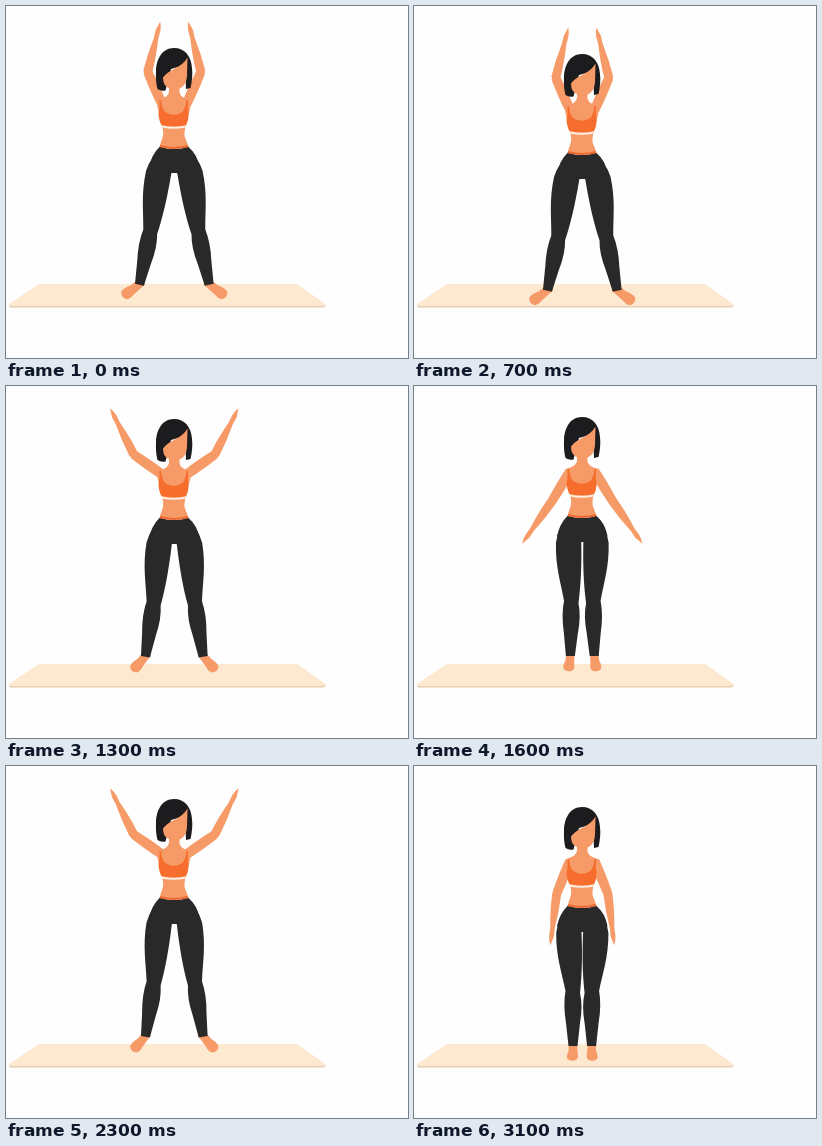
Animation of 402 by 352 pixels, one loop 3.2 s. Source, as an HTML page without scripts:

```html
<!DOCTYPE html>
<html lang="en">
<head>
<meta charset="utf-8">
<title>Jumping jacks</title>
<style>
  html, body { margin: 0; width: 100%; height: 100%; overflow: hidden; background: #fefefe; }
  svg { display: block; width: 402px; height: 352px; }

  .skin { fill: #f69a67; }
  .pants { fill: #2a2929; }
  .hair { fill: #1c1b1e; }
  .bra { fill: #f66d2d; }

  /* --y height, --u upper arm, --f forearm, --l leg spread in degrees */
  .person {
    --y: 0px; --u: 22deg; --f: 7deg; --l: 0;
    transform: translateY(var(--y));
    animation: jack 3.2s step-end infinite;
  }
  .arm { transform: translate(155.5px, 96px) rotate(var(--u)); }
  .forearm { transform: translateY(34px) rotate(calc(var(--f) - var(--u))); }
  .leg { transform: translate(157px, 155px) rotate(calc(var(--l) * 1deg)); }
  /* feet turn out and lengthen as the legs open */
  .foot {
    transform: translate(2px, 124px) rotate(calc(var(--l) * 3.3deg)) scaleY(calc(1 + var(--l) * .03));
  }

  @keyframes jack {
    /* standing */
    9.375%, 31.25%, 53.125%, 78.125%, 96.875% { --y: 0px; --u: 22deg; --f: 7deg; --l: 0; }
    /* arms low, off the ground */
    15.625%, 37.5%, 50%, 59.375%, 75%, 81.25% { --y: -10px; --u: 31deg; --f: 35deg; --l: 1.2; }
    /* arms level */
    6.25%, 28.125%, 93.75% { --y: -10px; --u: 82deg; --f: 98deg; --l: 5; }
    /* arms raised wide */
    18.75%, 25%, 40.625%, 46.875%, 62.5%, 71.875%, 84.375%, 90.625% { --y: -8px; --u: 125deg; --f: 153deg; --l: 9; }
    /* arms overhead */
    3.125%, 65.625%, 87.5% { --y: -1px; --u: 156deg; --f: 180deg; --l: 11.4; }
    /* landed wide */
    0%, 43.75% { --y: 1px; --u: 156deg; --f: 194deg; --l: 11.8; }
    /* deep landing */
    21.875% { --y: 7px; --u: 156deg; --f: 194deg; --l: 11.8; }
  }
</style>
</head>
<body>
<svg viewBox="0 0 402 352">
  <defs>
    <g id="arm" class="skin">
      <g class="arm">
        <path d="M-4.700 -1Q0 -6 4.700 -1Q5.500 14 4.500 34Q0 39 -4.500 34Q-5.500 14 -4.700 -1Z"/>
        <g class="forearm">
          <path d="M-4.500 0Q0 -5 4.500 0Q4.500 18 2.200 35L2.400 43L0 52Q-2 48 -2.400 43L-2.200 35Q-4.800 16 -4.500 0Z"/>
        </g>
      </g>
    </g>
    <g id="leg">
      <g class="leg">
        <g class="foot skin">
          <path d="M-4 -3H4L4.500 8Q6 13 3 15Q-2 17 -5.500 14Q-7 11 -4.500 6Z"/>
        </g>
        <path class="pants" d="M-3 -14Q-13 -4 -14.800 12C-15 36 -9 52 -5.500 70Q-8 84 -5 102L-2.500 125H6.500L9 102Q12 85 9 72C11 54 11.500 35 10.500 11L11 -10Z"/>
      </g>
    </g>
  </defs>

  <rect width="402" height="352" fill="#fefefe"/>
  <path d="M3 298H319.500V299.500Q319 301.500 317 301.500H5Q3 301.500 3 299.500Z" fill="#e9cfb1"/>
  <path d="M33 278H291L319.500 298Q319 300 317 300H5Q3 300 3 298Z" fill="#fce9d0"/>

  <g class="person">
    <use href="#arm"/>
    <use href="#arm" transform="translate(336.600) scale(-1 1)"/>
    <use href="#leg"/>
    <use href="#leg" transform="translate(336.600) scale(-1 1)"/>

    <path class="skin" d="M163 76V85Q162 90 155 92Q150 95 152 102L155 116Q158 124 157 129L153 141H183L178.500 129Q178 124 180.500 116L184 102Q186 95 181 92Q174 90 173.500 85V76Z"/>
    <path class="pants" d="M153.500 140Q168 144 182.500 140Q191 147 193.500 160L186 166H151L143 160Q146 147 153.500 140Z"/>
    <path d="M154 139Q168 143 182 139" fill="none" stroke="#ee682f" stroke-width="2"/>
    <path class="bra" d="M153.500 93H155Q156 103 160 105.500Q168 110 175.500 105.500Q179.500 103 180.500 93H182Q181.500 101 182.500 107Q182.500 114 180 118Q168 121 155.500 118Q153 114 152.500 107Q154 101 153.500 93Z"/>
    <path d="M156 119.500Q168 122 179.500 119.500" fill="none" stroke="#fdeee2" stroke-width="2"/>

    <path class="hair" d="M168 41C156 41 150.500 52 150 64Q149.500 75 151.500 82Q155 84.500 159.500 83.500L165 62L179 58L180 82L184.500 81Q187 70 186 61C185 49 179 41 168 41Z"/>
    <path class="skin" d="M181.500 50.500Q178 57 168 62Q160 66 157 70.500Q157 82 169 82Q180 82 181 69Z"/>
  </g>
</svg>
</body>
</html>
```
